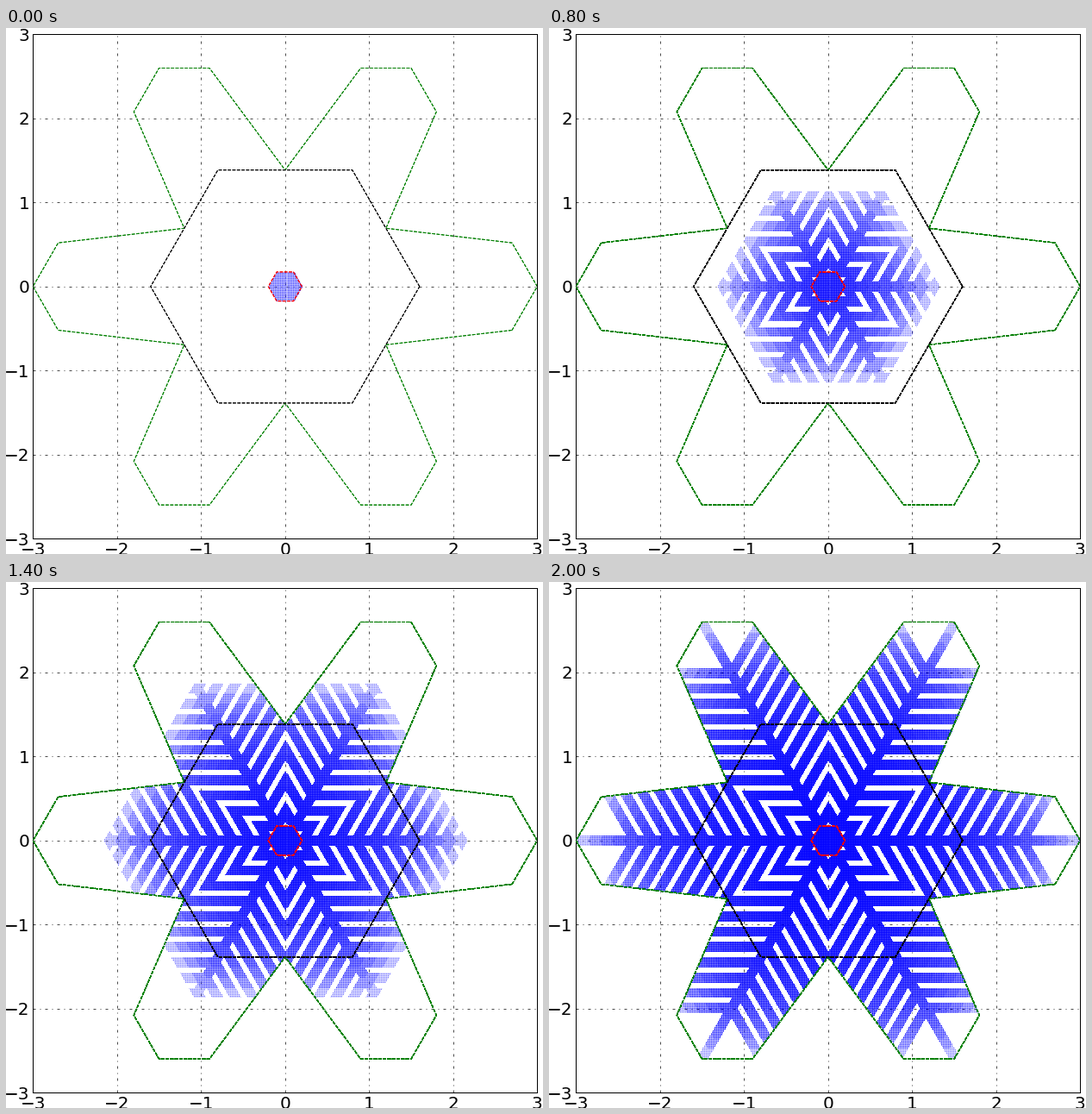
A matplotlib script for the animation above (2100 ms loop, 623x610 px).

```python
import numpy as np
import matplotlib.pyplot as plt
from matplotlib.animation import FuncAnimation

W, H, DPI = 623, 610, 100
PX = 72 / DPI             # one pixel in points
UNIT = 97.5               # pixels per data unit
FRAMES, STEP_MS = 21, 100
SEED, GROWTH = 0.2, 0.14
PITCH, HALF = 0.21, 0.06  # branch spacing, half thickness
BRANCHES = 10
S3 = np.sqrt(3)


def hexagon(r):
    a = np.radians(np.arange(0, 361, 60))
    return r * np.cos(a), r * np.sin(a)


def star():
    """Six blunt arms, each made of one tip and its neighbours."""
    arm = np.array([[2.7, -0.3 * S3], [3, 0], [2.7, 0.3 * S3], [1.2, 0.4 * S3]])
    pts = []
    for k in range(6):
        c, s = np.cos(k * np.pi / 3), np.sin(k * np.pi / 3)
        pts.append(arm @ np.array([[c, s], [-s, c]]))
    pts = np.vstack(pts)
    return np.append(pts, pts[:1], axis=0).T


# Fold the plane onto half an arm: u along it, v away from it.
N = 292
px = np.arange(-N, N) + 0.5
X, Y = np.meshgrid(px / UNIT, -px / UNIT)
ang = np.arctan2(Y, X)
ang = np.abs((ang + np.pi / 6) % (np.pi / 3) - np.pi / 6)
rad = np.hypot(X, Y)
u, v = rad * np.cos(ang), rad * np.sin(ang)
ring = u + v / S3         # radius of the hexagon through the point
root = u - v / S3         # where the point's branch leaves the arm

node = SEED + PITCH * np.clip(np.round((root - SEED) / PITCH), 0, BRANCHES)
branch = np.abs(root - node) * S3 / 2 <= HALF
inside = (ring <= 3) & (v <= 0.3 * S3 + (2.7 - u) * 0.2 * S3 / 3)
crystal = (ring <= SEED) | (inside & (branch | (v <= HALF)))

# The seed is inked once before the growth starts.
birth = np.ceil((ring - SEED) / GROWTH - 1e-6)
birth = np.where(ring <= SEED, -1, birth)

# Ink of one pass: a dot on every second pixel that bleeds a little.
ink = np.tile([[0.5, 0.2], [0.2, 0.09]], (N, N))


def layer(n):
    passes = np.where(crystal, np.maximum(n - birth + 1, 0), 0)
    rgba = np.zeros((2 * N, 2 * N, 4))
    rgba[..., 2] = 1
    rgba[..., 3] = 1 - (1 - ink) ** passes
    return rgba


fig = plt.figure(figsize=(W / 100, H / 100), dpi=DPI, facecolor="white")
ax = fig.add_axes([31.3 / W, 17.7 / H, 585 / W, 585 / H])
edge = N / UNIT
dots = ax.imshow(layer(0), extent=(-edge, edge, -edge, edge), aspect="auto",
                 interpolation="nearest", zorder=2)
ax.set(xlim=(-3, 3), ylim=(-3, 3),
       xticks=range(-3, 4), yticks=range(-3, 4))
ax.set_axisbelow(True)
ax.grid(color="black", lw=0.7 * PX,
        ls=(0, [d / 0.7 for d in (3, 5, 1, 5)]))
ax.tick_params(length=0, pad=4 * PX, labelsize=20 * PX,
               labelfontfamily="DejaVu Sans")
for spine in ax.spines.values():
    spine.set_linewidth(PX)

# Outlines are inked once more on every step, so their dashes fill in.
shapes = [(star(), "green"), (hexagon(1.6), "black"), (hexagon(SEED), "red")]
coats = [[ax.plot(*xy, "--", color=c, lw=PX, zorder=3)[0] for xy, c in shapes]
         for _ in range(FRAMES + 1)]


def update(n):
    dots.set_data(layer(n))
    for k, coat in enumerate(coats):
        for line in coat:
            line.set_visible(k <= n + 1)
    return [dots]


anim = FuncAnimation(fig, update, frames=FRAMES, interval=STEP_MS,
                     repeat=True, repeat_delay=0, blit=False)
plt.show()
```
